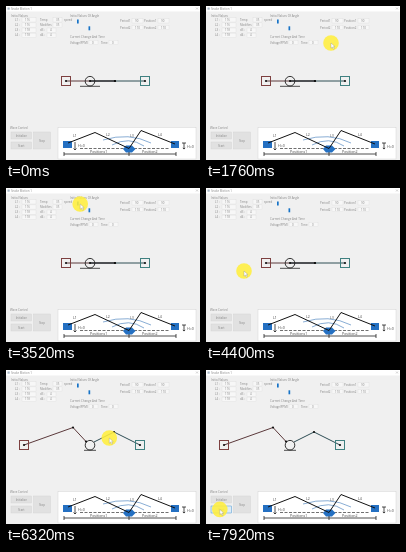
Recreate the animation shown at these times as an HTML page. Size 194 by 154 pixels, loop 8000 ms.

```html
<!DOCTYPE html>
<html lang="en">
<head>
<meta charset="utf-8">
<style>
html, body { margin: 0; width: 100%; height: 100%; overflow: hidden; background: #f0f0f0; }
svg { display: block; width: 100vw; height: 100vh; font: 2.9px "Open Sans", "Noto Sans", sans-serif; fill: #858585; }
#marks { font-size: 3.6px; fill: #444; }
</style>
</head>
<body>
<svg viewBox="0 0 194 154">
  <rect width="194" height="154" fill="#f0f0f0"/>
  <rect width="194" height="5.5" fill="#fff"/>
  <rect x="1.5" y="1.5" width="2.2" height="2.2" fill="#a8b8c8"/>
  <path d="M190 1.5l2 2m0-2l-2 2" stroke="#999" stroke-width=".4"/>
  <g id="form">
    <text x="5" y="3.8">Snake Motion 1</text>
    <text x="5" y="10.8">Initial Values</text>
    <text x="58" y="15">speed</text>
    <text x="64" y="10.8">Initial Values Of Angle</text>
    <text x="64" y="32">Current Change And Time</text>
    <text x="4" y="123">Wave Control</text>
  </g>
  <g id="buttons"></g>

  <rect x="52" y="121.5" width="138" height="31.5" fill="#fff" stroke="#ccc" stroke-width=".4"/>
  <path d="M74 142.5H164" stroke="#333" stroke-width=".7" stroke-dasharray="3 1.5"/>
  <path d="M97 134Q123 126 145 137M106 139Q123 130 138 140" fill="none" stroke="#3976b8" stroke-width=".6"/>
  <g fill="#2470c2">
    <rect x="57" y="135" width="9" height="7"/>
    <path d="M117 143L120 139.5H126L129.5 143L126 146.5H120Z"/>
    <rect x="165" y="135" width="8" height="7"/>
  </g>
  <path d="M62 137L89 126.5L123 142.5L135 124.5L169 138" fill="none" stroke="#111"/>
  <path d="M58 148H170M58 146v4M123 146v4M170 146v4M69 136v8m-1.5-1.5l1.5 1.5 1.5-1.5M178 137v6m-1.2-1l1.2 1 1.2-1M176 137h4" fill="none" stroke="#222" stroke-width=".8"/>
  <g id="marks">
    <text x="67" y="131">L1</text><text x="100" y="130">L2</text>
    <text x="124" y="131">L3</text><text x="152" y="130">L4</text>
    <text x="72" y="141">H=0</text><text x="181" y="142">H=0</text>
    <text x="84" y="147">Positions1</text><text x="136" y="147">Position2</text>
  </g>

  <g fill="none">
    <path id="leftLeg" stroke="#4a2426" stroke-width=".9"/>
    <path id="rightLeg" stroke="#183a42" stroke-width=".9"/>
    <rect id="leftBox" y="70.5" width="9" height="9" stroke="#7d4040"/>
    <rect id="rightBox" y="70.5" width="9" height="9" stroke="#3f8080"/>
    <circle cx="84" cy="75.2" r="4.8" stroke="#222" stroke-width=".9"/>
    <path id="base" stroke="#222" stroke-width=".8"/>
    <g id="joints" fill="#111"></g>
  </g>

  <g id="cursor">
    <circle r="7.8" fill="#ffee3c" opacity=".88"/>
    <path d="M0 0V5.2L1.3 4 2.3 6.2 3.2 5.8 2.3 3.7H4Z" fill="#fff" stroke="#888" stroke-width=".35"/>
  </g>
</svg>
<script>
const $ = id => document.getElementById(id);

function add(parent, tag, attrs, text = "") {
  const node = document.createElementNS("http://www.w3.org/2000/svg", tag);
  set(node, attrs);
  node.textContent = text;
  $(parent).append(node);
  return node;
}

function set(node, attrs) {
  for (const key in attrs) node.setAttribute(key, attrs[key]);
}

// A caption followed by its value box
function field(x, y, name, gap, value, width = 11) {
  add("form", "text", { x, y }, name);
  add("form", "rect", { x: x + gap, y: y - 3.2, width, height: 4.2, fill: "#f7f7f7", stroke: "#d8d8d8", "stroke-width": .3 });
  add("form", "text", { x: x + gap + 3, y }, value);
}

["Temp", "Modifies", "d3 :", "d4 :"].forEach((name, i) => {
  const y = 15 + i * 5.1;
  field(9, y, `L${i + 1} :`, 7, i < 2 ? "116" : "118", 14);
  field(34, y, name, i < 2 ? 13 : 7, i < 2 ? "35" : "4", 9);
});

for (const i of [0, 1]) {
  const y = 15.5 + i * 6.8;
  const angle = i ? "110" : "90";
  add("form", "rect", { x: 71 + i * 11.5, y: y - 2, width: 1.7, height: 4, fill: "#1673c7" });
  field(114, y + .5, `Period${i + 1}`, 12, angle);
  field(138, y + .5, `Position${i + 1}`, 14, angle);
}
field(64, 37.5, "Voltage(PPM)", 19, "0", 9);
field(95, 37.5, "Time", 8, "0", 9);

function button(x, y, width, height, text) {
  const box = add("buttons", "rect", { x, y, width, height, "stroke-width": .4 });
  add("buttons", "text", { x: x + width / 2, y: y + height / 2 + 1, "text-anchor": "middle" }, text);
  return box;
}

function light(box, on) {
  set(box, { fill: on ? "#dcecf8" : "#e1e1e1", stroke: on ? "#2581c8" : "#cfcfcf" });
}

const init = button(5, 126, 20.5, 7, "Initialize");
const start = button(5, 136, 20.5, 7, "Start");
light(button(27.5, 126, 17, 17, "Stop"), false);

// Left foot, left knee, hub, right knee, right foot
const flat = [[60, 75], [109, 75], [84, 75], [109, 75], [139, 75]];
const bent = [[18, 75], [67, 57.5], [80, 71.5], [108, 62], [134, 75]];
const dots = flat.map(() => add("joints", "circle", { r: 1.1 }));

function drawRobot(open) {
  const pose = open ? bent : flat;
  const hubRight = open ? [88, 72] : pose[2];
  set($("leftLeg"), { d: "M" + pose.slice(0, 3).join("L") });
  set($("rightLeg"), { d: "M" + [hubRight, pose[3], pose[4]].join("L") });
  set($("leftBox"), { x: pose[0][0] - 4.5 });
  set($("rightBox"), { x: pose[4][0] - 4.5 });
  set($("base"), { d: open ? "M78 80.3H90" : "M74 80.3H94" });
  dots.forEach((dot, i) => set(dot, { cx: pose[i][0], cy: pose[i][1] }));
}

// Key stops of the pointer: time, x, y
const stops = [
  [160, 132, 21], [640, 118, 29], [1200, 118, 29], [1440, 30, 115],
  [1760, 125, 37], [2080, 130, 20], [2800, 76, 18], [3200, 87, 16],
  [3600, 71, 16], [3840, 150, 16], [4160, 137, 16], [4400, 38, 83],
  [4800, 13, 125], [5120, 22, 126], [5520, 22, 126], [6080, 71, 62],
  [6400, 114, 70], [6960, 81, 86], [7600, 9, 141], [8000, 15, 139]
];

function pointer(t) {
  const i = stops.findIndex(stop => stop[0] > t);
  const [t0, x0, y0] = stops[i - 1];
  const [t1, x1, y1] = stops[i];
  const p = (t - t0) / (t1 - t0);
  return [x0 + (x1 - x0) * p, y0 + (y1 - y0) * p];
}

function draw(now) {
  const t = Math.floor(now % 8000 / 80) * 80;
  const shown = t >= stops[0][0];
  const [x, y] = shown ? pointer(t) : [0, 0];
  set($("cursor"), { visibility: shown ? "visible" : "hidden", transform: `translate(${x} ${y})` });
  const over = x > 5 && x < 26;
  light(init, over && y > 125 && y < 133);
  light(start, over && y > 135 && y < 143);
  drawRobot(t >= 5040);
}

const begin = performance.now();
function loop() {
  draw(performance.now() - begin);
  requestAnimationFrame(loop);
}
loop();
</script>
</body>
</html>
```
